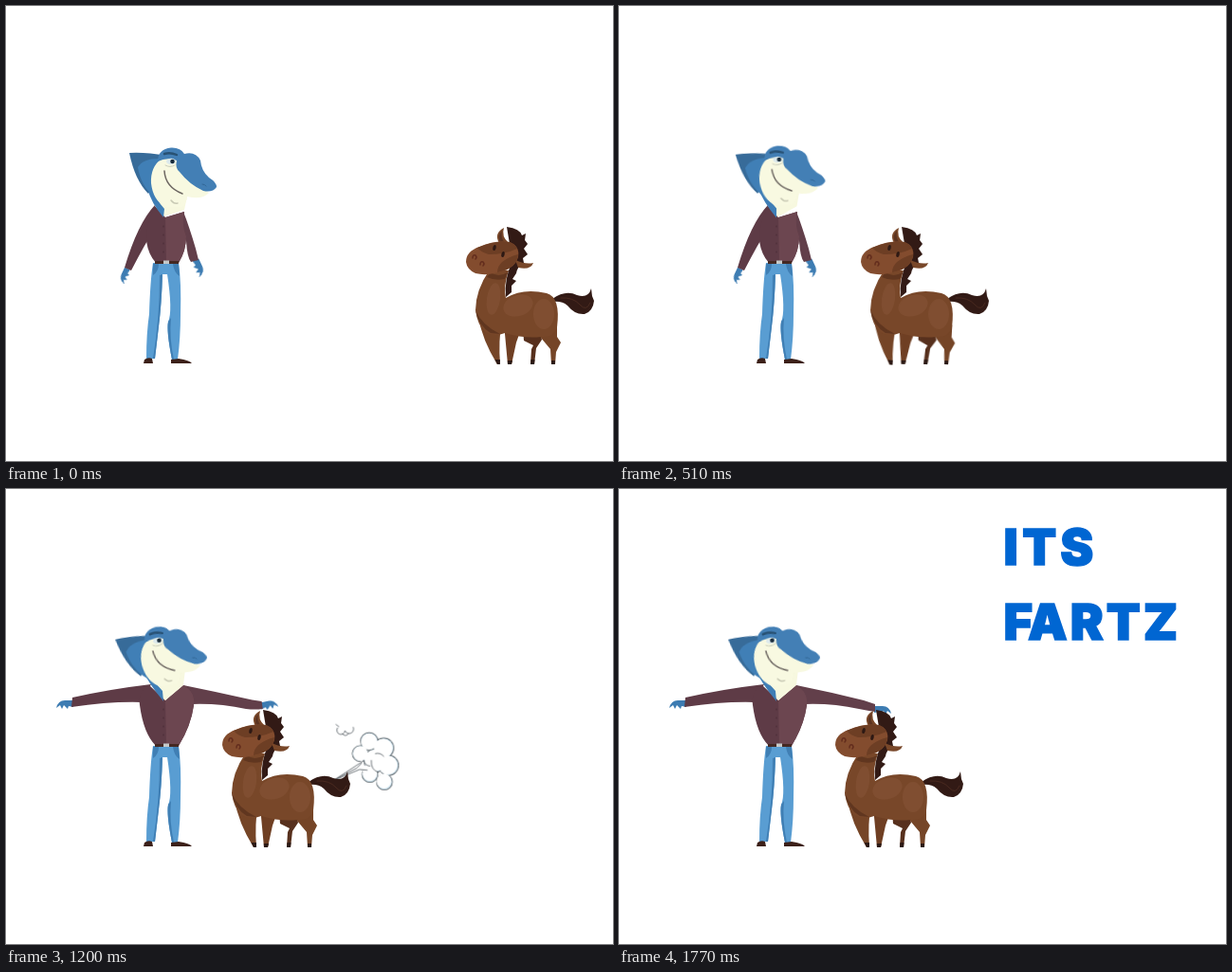
Recreate the animation shown at these times as an HTML page. Size 640 by 480 pixels, loop 1.8 s.

```html
<!DOCTYPE html>
<html lang="en">
<head>
<meta charset="utf-8">
<title>Shark and horse</title>
<style>
html, body { margin: 0; width: 100%; height: 100%; overflow: hidden; background: #fff; }
svg { display: block; width: 640px; height: 480px; }

/* Every part shares one 1800 ms loop; 1% is 18 ms. */
.move { animation: 1800ms linear -2ms infinite; }

/* Horse: trots in at 30 ms steps, then stands. */
#horse { animation-name: trot; }
@keyframes trot {
  0% { transform: translateX(0); animation-timing-function: steps(19, end); }
  31.667%, 100% { transform: translateX(-257px); }
}
.leg { animation-name: stride; animation-timing-function: ease-in-out; }
@keyframes stride {
  0%, 13.333%, 26.667%, 31.667%, 100% { transform: rotate(0deg); }
  3.333%, 16.667% { transform: rotate(calc(var(--a) / 2 + var(--b))); }
  6.667%, 20% { transform: rotate(var(--a)); }
  10%, 23.333% { transform: rotate(calc(var(--a) / 2 - var(--b))); }
  30% { transform: rotate(calc(var(--a) / 2)); }
}
#foreNear { transform-origin: 508px 336px; --a: 12deg; --b: 4deg; }
#foreFar { transform-origin: 534px 340px; --a: 8deg; --b: -4deg; }
#hindFar { transform-origin: 554px 346px; --a: 12deg; --b: -4deg; }
#hindNear { transform-origin: 573px 342px; --a: 11deg; --b: 4deg; }

/* Shark: head tilts back, then the arms open. */
#head { transform-origin: 176px 172.5px; animation-name: tilt; }
@keyframes tilt {
  0%, 26.667% { transform: none; }
  30.556%, 100% { transform: translate(-12.5px, -4.5px) rotate(-10deg); }
}
#neck { animation-name: neck; }
@keyframes neck {
  0%, 26.667% { d: path("M154 192 Q157 206 167 222 L188 215 L192 196 Z"); }
  30.556%, 100% { d: path("M143 182 Q150 204 168 223 L187 207 L189 190 Z"); }
}
#nape { animation-name: nape; }
@keyframes nape {
  0%, 26.667% { d: path("M149 192 Q153 208 166 223 L167 214 Q158 205 155 188 Z"); }
  30.556%, 100% { d: path("M142 188 Q151 206 166 224 L165 213 Q155 203 148 185 Z"); }
}
#chest { animation-name: chest; }
@keyframes chest {
  0%, 29.444% { d: path("M157 211 Q147 232 148 248 Q150 262 158 271 L182 271 Q190 258 190 243 Q185 230 188 217 L168 223 Z"); }
  35.556%, 100% { d: path("M151 207 Q139 214 141 228 Q145 258 158 271 L182 271 Q195 250 198 228 Q200 214 187 207 L168 223 Z"); }
}
#placket { animation-name: placket; }
@keyframes placket {
  0%, 29.444% { d: path("M168 223 L169 271 L182 271 Q190 258 190 243 Q185 230 188 217 Z"); }
  35.556%, 100% { d: path("M168 223 L169 271 L182 271 Q195 250 198 228 Q200 214 187 207 Z"); }
}
#sleeveL { animation-name: sleeveL; }
@keyframes sleeveL {
  0%, 29.444% { d: path("M157 210 Q139 229 125 276 L132 279 Q146 252 156 236 Z"); }
  35.556%, 100% { d: path("M153 206 Q110 211 70 220 L69 230 Q110 224 143 225 Z"); }
}
#sleeveR { animation-name: sleeveR; }
@keyframes sleeveR {
  0%, 29.444% { d: path("M187 217 Q193 232 200 256 L203 268 L195 270 Q191 265 190 248 Q187 240 183 230 Z"); }
  35.556%, 61.667% { d: path("M187 207 Q222 214 262 222 L269 219 L272 227 Q263 232 253 232 Q225 226 196 227 Z"); }
  70%, 100% { d: path("M187 207 Q222 214 258 223 L270 227 L270 235 Q263 234 253 232 Q225 226 196 227 Z"); }
}
#handL { animation-name: handL; }
@keyframes handL {
  0%, 29.444% { transform: translate(128px, 278px) rotate(-65deg) scale(-.9, .9); }
  35.556%, 100% { transform: translate(70px, 227px) rotate(0deg) scale(-1, 1); }
}
#handR { animation-name: handR; }
@keyframes handR {
  0%, 29.444% { transform: translate(200px, 269px) rotate(65deg); }
  35.556% { transform: translate(269px, 224px) rotate(-27deg); }
  61.667% { transform: translate(269px, 223px) rotate(-31deg); }
  70%, 100% { transform: translate(270px, 233px) rotate(0deg); }
}

/* Puff: swells out from behind the tail and fades. */
#puff { animation-name: swell, fade; }
@keyframes swell {
  0%, 50% { transform: translate(173px, 225px) scale(.36); }
  55% { transform: translate(148.5px, 193.5px) scale(.45); }
  78.333% { transform: none; }
  90%, 100% { transform: translate(-125px, -146px) scale(1.41); }
}
@keyframes fade {
  0%, 51% { opacity: 0; }
  54%, 90% { opacity: 1; }
  98.333%, 100% { opacity: 0; }
}
#title {
  animation-name: show; animation-timing-function: step-end;
  font: 900 52.5px Inter, "Arial Black", sans-serif;
  fill: #0066d2; stroke: #0066d2; stroke-width: 1.5;
}
@keyframes show { 0% { opacity: 0; } 83.333%, 100% { opacity: 1; } }

.line { fill: none; stroke-linecap: round; stroke-linejoin: round; }
</style>
</head>
<body>
<svg viewBox="0 0 640 480">
  <defs>
    <path id="hand" d="M-1 -4 L8 -4 Q15 -4 17 4 L13 1 L11 5 L9 1 L5 5 L4 2 L-1 3 Z"/>
    <g id="lobes">
      <circle cx="425" cy="234" r="12"/>
      <circle cx="446" cy="244" r="14"/>
      <circle cx="412" cy="252" r="11"/>
      <circle cx="426" cy="282" r="11"/>
      <circle cx="447" cy="293" r="11"/>
      <circle cx="453" cy="269" r="14"/>
      <circle cx="434" cy="262" r="16"/>
    </g>
  </defs>

  <g id="puff" class="move">
    <use href="#lobes" fill="#fff" stroke="#414a50" stroke-width="2"/>
    <use href="#lobes" fill="#d0e7f3"/>
    <use href="#lobes" fill="#fff" transform="translate(12.6 7.600) scale(.97)"/>
    <path d="M373 291 L416 261 L414 270 L424 269 L419 276 Z" fill="#fff"/>
    <g class="line" stroke="#414a50" stroke-width="1">
      <path d="M373 291 L416 263 M373 291 L411 275 L422 276 M373 291 L407 273 L414 266"/>
      <path d="M417 262 Q419 270 426 270 M428 262 Q427 276 438 279 M434 252 Q441 250 446 256"/>
      <path d="M377 210 L381 213 M379 215 A6 6 0 1 0 390 219 A6 6 0 1 0 402 214 M386 223 A5 5 0 0 0 395 223"/>
    </g>
  </g>

  <g id="shark">
    <g id="trousers">
      <path fill="#599dd2" d="M155 271 L182 271 Q185 292 184 325 Q184 350 181 373 L175 373 Q169 343 171 333 Q176 322 170 283 L165 283 Q164 315 161 338 L157 372 L148 372 Q148 345 151 325 Q152 290 155 271 Z"/>
      <path fill="#407fb4" d="M155 272 L161 272 Q161 280 155 284 Z M176 272 L182 272 L183 285 Q177 281 176 272 Z M165 283 Q164 315 161 338 L157 372 L155 372 Q162 330 162 284 Z M171 333 Q169 343 175 373 L177 373 Q172 350 174 329 Z"/>
      <path fill="#3c2019" d="M146 373 Q150 370 154 372 L155 377 L145 377 Z M174 373 L182 372 Q194 374 196 377 L174 377 Z"/>
    </g>
    <use id="handL" class="move" href="#hand" fill="#3d7cb2"/>
    <use id="handR" class="move" href="#hand" fill="#3d7cb2"/>
    <path id="sleeveL" class="move" fill="#5e3b46"/>
    <path id="sleeveR" class="move" fill="#623f4a"/>
    <path id="chest" class="move" fill="#5e3b46"/>
    <path id="placket" class="move" fill="#6c4650"/>
    <path class="line" stroke="#492d36" stroke-width="1" stroke-dasharray="1 8" d="M166 232 V266"/>
    <path fill="#452923" d="M157 269 H182 V272 H157 Z"/>
    <path fill="#c5c8c8" d="M166 268.500 H172 V272 H166 Z"/>
    <path id="neck" class="move" fill="#f7f8df"/>
    <path id="nape" class="move" fill="#3f7eb6"/>

    <g id="head" class="move">
      <path fill="#376b99" d="M130 155 Q148 154 168 158 L160 182 L150 198 Q136 184 130 155 Z"/>
      <path fill="#407fb6" d="M139 170 Q145 160 165 161 L157 202 Q142 190 139 170 Z"/>
      <path fill="#f8f9e1" d="M164 161 Q152 170 153 187 Q155 205 168 212 L186 212 Q191 206 191 201 Q207 205 214 197 Q191 183 182 160 Z"/>
      <path fill="#437fb5" d="M160 164 Q160 151 174 149.500 Q184 149 188 156 Q200 153 205 163 Q206 174 214 181 Q222 186 222 191 Q218 197 208 195 Q193 188 183 175 Q178 171 180 163 Q170 159 160 164 Z"/>
      <path class="line" stroke="#285173" stroke-width="2.400" d="M167 156 Q173 154 180 157"/>
      <ellipse cx="174" cy="164" rx="5" ry="3.300" fill="#dce9ec"/>
      <circle cx="175.500" cy="164" r="2.300" fill="#182b3a"/>
      <path class="line" stroke="#c9cdbb" stroke-width="1" d="M168 168 Q173 171 178 168"/>
      <path class="line" stroke="#6c6661" stroke-width="1.500" d="M167 174 Q168 191 186 198"/>
      <path class="line" stroke="#c9cab5" stroke-width="1.500" d="M174 205 Q177 209 181 208"/>
      <path class="line" stroke="#326897" stroke-width="1" d="M207 188 Q210 188 211 190"/>
    </g>
  </g>

  <g id="horse" class="move">
    <path fill="#321a15" d="M576 309 Q590 299 602 305 Q614 309 617 298 L618 306 L620 311 Q619 322 610 325 Q600 326 592 316 Q586 311 577 312 Z"/>
    <path class="line" stroke="#4a2a20" stroke-width="1" d="M585 308 Q598 307 605 315 T616 313"/>
    <g id="hindFar" class="leg move">
      <path fill="#57301d" d="M545 340 L563 343 L565 352 L559 361 L557 378 L553 378 L554 362 L556 358 L546 353 Z"/>
      <path fill="#2c1914" d="M553.500 373 H557.500 L557 378 H553 Z"/>
    </g>
    <g id="hindNear" class="leg move">
      <path fill="#754527" d="M560 340 L581 336 L581 349 L585 355 L580 365 L579 378 L575 378 L574 362 L564 350 Z"/>
      <path fill="#2c1914" d="M575 374 H579 V378 H575 Z"/>
    </g>
    <g id="foreFar" class="leg move">
      <path fill="#6f3f23" d="M525 335 L544 338 L538 355 L533 378 L529 378 Z"/>
      <path fill="#2c1914" d="M528.800 374 H534 L533 378 H529 Z"/>
    </g>
    <g id="foreNear" class="leg move">
      <path fill="#754527" d="M498 328 L523 330 Q519 353 521 378 L518 378 Q502 352 498 328 Z"/>
      <path fill="#2c1914" d="M515.500 373 H521 V378 H518 Z"/>
    </g>
    <path fill="#784729" d="M510 278 Q495 300 495 321 Q497 335 504 343 Q514 350 526 345 Q547 351 564 349 Q578 350 581 339 Q585 307 570 303 Q545 297 527 308 Q524 297 530 279 Z"/>
    <path fill="#60361f" d="M511 281 Q519 287 529 281 L526 288 Q515 290 507 286 Z M495 321 Q498 337 511 345 L521 346 Q502 337 495 321 Z"/>
    <g fill="#865437" opacity=".6">
      <ellipse cx="514" cy="309" rx="7" ry="17" transform="rotate(8 514 309)"/>
      <ellipse cx="540" cy="316" rx="16" ry="11" transform="rotate(-18 540 316)"/>
      <ellipse cx="567" cy="325" rx="11" ry="16"/>
    </g>
    <path fill="#321a15" d="M528 233 Q542 235 544 242 L548 240 L547 247 L550 251 L546 256 L550 262 L545 266 L546 271 Q539 275 538 282 L534 288 L538 290 L533 295 L533 302 L527 307 Q525 288 534 269 Z"/>
    <path fill="#784729" d="M520 250 Q514 240 525 234 Q522 243 530 250 Z M537 268 Q548 273 556 271 Q553 279 540 276 Z"/>
    <path fill="#5a3321" d="M521 249 Q518 242 523 237 Q521 244 526 250 Z"/>
    <path fill="#834c2e" d="M485 270 Q485 259 499 254 Q516 247 531 249 Q542 253 540 265 Q537 276 523 280 Q507 285 495 282 Q486 278 485 270 Z"/>
    <path fill="#6d3e24" d="M497 255 Q517 247 531 249 Q537 251 539 256 Q526 262 509 262 Q501 260 497 255 Z M540 262 Q539 277 518 281 Q518 268 540 262 Z"/>
    <g fill="#2d1914">
      <ellipse cx="515" cy="255" rx="1.700" ry="3" transform="rotate(15 515 255)"/>
      <ellipse cx="524" cy="262" rx="1.700" ry="3" transform="rotate(15 524 262)"/>
    </g>
    <g class="line" stroke="#632d1d" stroke-width="1.500">
      <path d="M492 266 Q492 262 495 263 Q497 265 495 267 M500 273 Q500 269 503 270 Q505 272 503 274"/>
    </g>
  </g>

  <g id="title" class="move">
    <text x="405.500" y="79.500" letter-spacing="4.500">ITS</text>
    <text x="405.500" y="158.500" dx="0 -3.500" letter-spacing="3">FARTZ</text>
  </g>
</svg>
</body>
</html>
```
